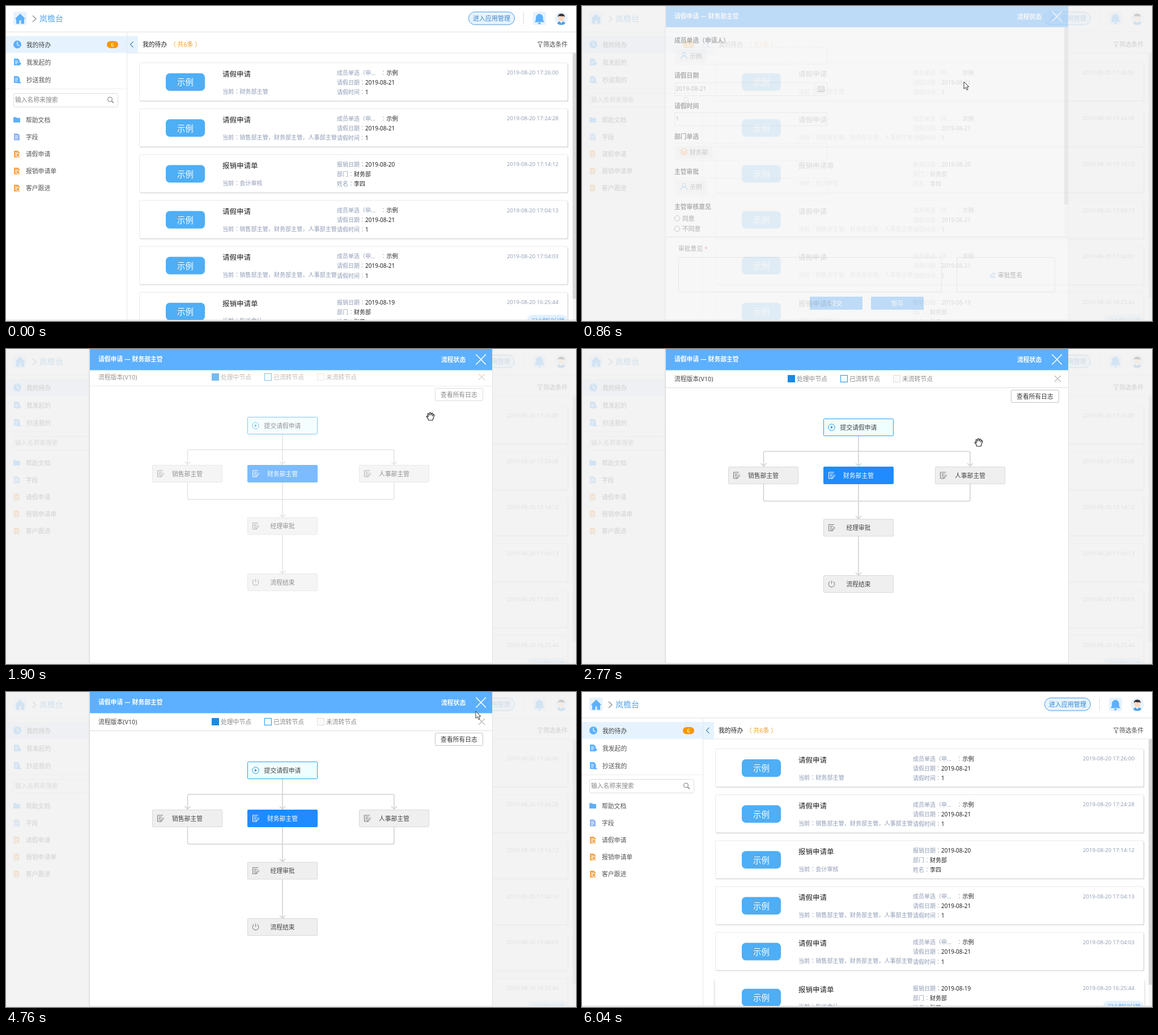
These frames come from a looping animation (1006x557 px, 6430 ms). An HTML page:

```html
<!DOCTYPE html>
<html lang="zh-CN">
<head>
<meta charset="utf-8">
<title>流程待办</title>
<style>
html, body { margin: 0; width: 100%; height: 100%; overflow: hidden; background: #fff; }
svg { display: block; width: 100vw; height: 100vh; }
text { font-family: "Noto Sans", "Noto Sans CJK SC", "Noto Sans CJK", sans-serif; white-space: pre; }
.colon { font-family: "Noto Sans CJK TC", "Noto Sans CJK", sans-serif; }
</style>
</head>
<body>
<svg id="stage" viewBox="0 0 1006 557" xmlns="http://www.w3.org/2000/svg"></svg>
<script>
const LOOP = 6430, BLUE = '#5cb0ff', MUTED = '#8f9bb5';

// Drawing helpers; text is placed by its vertical centre, full-width colons are centred in their cell.
const centreColons = str => str.replace(/：/g, '<tspan class="colon" lang="zh-TW">：</tspan>');
const text = (x, cy, str, size = 10.8, fill = '#555', extra = '') =>
  `<text x="${x}" y="${cy + size * 0.38}" font-size="${size}" fill="${fill}" ${extra}>${centreColons(str)}</text>`;
const rect = (x, y, w, h, fill, stroke = 'none', rx = 0, extra = '') =>
  `<rect x="${x}" y="${y}" width="${w}" height="${h}" fill="${fill}" stroke="${stroke}" rx="${rx}" ${extra}/>`;
const path = (d, stroke, width = 1, fill = 'none', extra = '') =>
  `<path d="${d}" stroke="${stroke}" stroke-width="${width}" fill="${fill}" ${extra}/>`;
const circle = (x, y, r, fill, stroke = 'none', extra = '') =>
  `<circle cx="${x}" cy="${y}" r="${r}" fill="${fill}" stroke="${stroke}" ${extra}/>`;
const at = (x, y, body) => `<g transform="translate(${x} ${y})">${body}</g>`;
const group = (id, body, extra = '') => `<g id="${id}" ${extra}>${body}</g>`;
const BOLD = 'font-weight="700"', MIDDLE = 'text-anchor="middle"', END = 'text-anchor="end"';

function header() {
  return rect(0, 0, 1006, 45, '#fff') + rect(0, 45, 1006, 1, '#ececec') + rect(0, 46, 1006, 1.5, '#f5f5f5') +
    rect(13, 10, 23.5, 23.5, '#e6f2ff', 'none', 3) +
    path('M25 14L33.500 22.500H31.500V31H27V25H23V31H18.500V22.500H16.500Z', BLUE, 1, BLUE, 'stroke-linejoin="round"') +
    path('M47 17L53 22.500L47 28', '#888', 1.2) +
    text(59, 22, '岚檐台', 14, '#55a5e8') +
    rect(816.5, 10.5, 81, 22.5, '#e6f3ff', '#4a98e0', 11.2) +
    text(857, 22, '进入应用管理', 11, '#3c84c8', MIDDLE) +
    rect(913, 11, 1, 22, '#ddd') +
    rect(930, 10, 23, 23.5, '#e6f2ff', 'none', 3) +
    path('M933.500 28C936 26 935.500 23 935.700 20C936 16.500 938.500 14.500 941.500 14.500S947 16.500 947.300 20C947.500 23 947 26 949.500 28Z', BLUE, 1, BLUE) +
    path('M939.500 30A2 2 0 0 0 943.500 30Z', BLUE, 1, BLUE) +
    circle(980, 22, 11.500, '#e8f2fc') +
    path('M973 31Q973.500 27 980 27T987 31Q984 33.500 980 33.500T973 31Z', 'none', 0, '#4ba3ea') +
    path('M977 26.500H983L980 30.500Z', 'none', 0, '#fff') +
    rect(975, 16, 10, 11, '#fbd9bd', 'none', 5) +
    path('M974 20Q973.500 13.500 980 13.500Q986.500 13.500 986 20L984.500 18Q980 18.500 976 17.500Z', 'none', 0, '#333640');
}

const docIcon = (color, mark) =>
  path('M0 0H7L10 3V12H0Z', 'none', 0, color) + path('M2 4H7M2 6.500H8M2 9H6', '#fff', 1) + mark;

function sidebar() {
  const form = docIcon('#f4a64b', circle(7, 8, 3, '#f4a64b', '#fff'));
  const links = [
    ['帮助文档', path('M0 1H5L6.500 2.500H12V10.500H0Z', 'none', 0, BLUE)],
    ['字段', docIcon('#8fb4f5', '')],
    ['请假申请', form], ['报销申请单', form], ['客户跟进', form]
  ];
  return rect(213, 46, 1, 511, '#e4e6ea') + rect(0, 53, 213, 30, '#e6f3ff') +
    circle(20, 68, 7, BLUE) + path('M20 63.500V68.500L23.500 70.500', '#fff', 1.2) +
    text(36, 69, '我的待办', 10.8, '#444') +
    rect(178, 62, 20, 12.5, '#f79708', 'none', 6.2) + text(188, 68.3, '6', 9.5, '#fff', MIDDLE) +
    at(14, 93, docIcon(BLUE, path('M6 9H12M9.500 6.500L12 9L9.500 11.500', BLUE, 1.6))) + text(36, 100, '我发起的') +
    at(14, 124, docIcon(BLUE, circle(9, 7, 2, BLUE) + path('M5.500 12Q9 7.500 12.500 12Z', BLUE, 1, BLUE))) + text(36, 131, '抄送我的') +
    rect(0, 146, 213, 1, '#eee') +
    rect(13.5, 154.5, 184, 24, '#fff', '#dcdcdc', 3) + text(16, 166, '输入名称来搜索', 10.8, '#888') +
    circle(183.5, 165, 4, 'none', '#777') + path('M186.500 168L190 171.500', '#777', 1.2) +
    links.map(([label, icon], i) => {
      const y = 201.5 + i * 30.1;
      return at(i ? 14 : 13, y - 6, icon) + text(35, y, label);
    }).join('');
}

const LEAVE = (status, time) => ({
  title: '请假申请', status, time,
  rows: [['成员单选（申...', '示例', 661], ['请假日期：', '2019-08-21'], ['请假时间：', '1']]
});
const EXPENSE = (status, time, date, name) => ({
  title: '报销申请单', status, time,
  rows: [['报销日期：', date], ['部门：', '财务部'], ['姓名：', name]]
});
const CHIEFS = '销售部主管，财务部主管，人事部主管';
const tasks = [
  LEAVE('财务部主管', '2019-08-20 17:26:00'),
  LEAVE(CHIEFS, '2019-08-20 17:24:28'),
  EXPENSE('会计审核', '2019-08-20 17:14:12', '2019-08-20', '李四'),
  LEAVE(CHIEFS, '2019-08-20 17:04:13'),
  LEAVE(CHIEFS, '2019-08-20 17:04:03'),
  EXPENSE('指派会计', '2019-08-20 16:25:44', '2019-08-19', '张三')
];
const cardTop = i => 100 + i * 81.15;

function card(task, i) {
  const row = ([label, value, x], k) => {
    const y = 18 + k * 17.1;
    return x
      ? text(584, y, label, 10, MUTED) + text(x, y, '：', 10, MUTED) + text(671.5, y, value, 10, '#222')
      : text(584, y, `${label}<tspan fill="#222">${value}</tspan>`, 10, MUTED);
  };
  return at(0, cardTop(i),
    group('plain' + i, rect(236, 2, 756.5, 67, '#d9d9d9', 'none', 2) + rect(235.5, 0.5, 755.5, 67, '#fff', '#e9e9e9', 2)) +
    group('hover' + i, rect(235, 0, 757, 68, '#fff', 'none', 2, 'filter="url(#lift)"')) +
    rect(282, 19, 69, 31, '#4eaef6', 'none', 7) + text(316.5, 35, '示例', 14.4, '#fff', MIDDLE) +
    text(382, 20, task.title, 12.5, '#222') +
    text(382, 50.7, '当前：' + task.status, 10.1, MUTED) +
    task.rows.map(row).join('') +
    text(975, 17.5, task.time, 9.65, '#95a0b8', END));
}

function list() {
  return rect(214, 53, 19, 30, '#e6f3ff') + path('M224.500 63L219.500 68L224.500 73', '#4a8fd0', 1.2) +
    text(241, 68, '我的待办', 10.8, '#222') + text(289, 68, '（ 共6条 ）', 10.8, '#f0a030') +
    path('M938.500 63.500H946.500L943.500 67.500V73L941.500 71.500V67.500Z', '#666') + text(948, 68, '筛选条件') +
    rect(214, 82.5, 792, 1, '#e4e4e4') +
    `<g clip-path="url(#listClip)">${tasks.map(card).join('')}` +
    rect(920, 546, 71, 20, '#e3f1ff', 'none', 9) + text(956.5, 555.5, '22小时50分钟', 9.2, '#4a9be8', MIDDLE) + '</g>' +
    rect(1000, 83, 6, 472, '#f5f5f5') + rect(1000, 83, 6, 435, '#d8d8d8', 'none', 2) +
    rect(0, 555, 1006, 1, '#cfcfcf');
}

const personIcon = circle(0, -2.5, 3, 'none', '#68b2f0') + path('M-5.500 6Q-5 1 0 1T5.500 6', '#68b2f0', 1.1);
const layersIcon = path('M-6 -2L0 -5.500L6 -2L0 1.500ZM-6 0.500L0 4L6 0.500M-6 3L0 6.500L6 3', '#f3ae62', 1.1);

function form() {
  const label = (y, s) => text(163, y, s, 10.8, '#333', BOLD);
  const picker = (y, s, icon, w) =>
    rect(163.5, y + 0.5, 269, 30, '#fff', '#e2e2e2', 0, 'stroke-dasharray="3 2"') +
    rect(166, y + 4, w, 24, '#f5f5f5', 'none', 2) + at(180, y + 15, icon) + text(190, y + 16, s, 10.8, '#777');
  const input = (y, s) => rect(163.5, y + 0.5, 269, 23, '#fff', '#ddd') + text(165, y + 11.5, s, 10.5, '#777');
  const radio = (y, s) => circle(168, y, 4.7, '#fff', '#777') + text(177, y, s, 10.8, '#333');
  const button = (x, s) => rect(x, 514, 93, 23, BLUE, 'none', 1) + text(x + 46.5, 525.7, s, 10.8, '#fff', MIDDLE + ' font-weight="500"');
  return label(61, '成员单选（申请人）') + picker(72.5, '示例', personIcon, 54) +
    label(123, '请假日期') + input(135, '2019-08-21') + path('M410.500 135V158', '#ddd') +
    path('M416.500 142.500H427.500V151.500H416.500ZM416.500 145H427.500M419 148H425.500M419 150H425.500M419 140.500V142.500M425 140.500V142.500', '#999') +
    label(177, '请假时间') + input(188, '1') +
    label(231, '部门单选') + picker(242.5, '财务部', layersIcon, 65) +
    label(293, '主管审批') + picker(304, '示例', personIcon, 54) +
    label(355, '主管审核意见') + radio(375.5, '同意') + radio(394, '不同意') +
    rect(851, 38, 7, 370, '#f4f4f4') + rect(851, 38, 7, 313, '#d6d6d6', 'none', 2) +
    path('M148 408.500H858', '#aaa', 1, 'none', 'stroke-dasharray="2.500 1.500"') +
    text(170, 429, '审批意见 <tspan fill="#e05a4a">*</tspan>', 10.8, '#444') +
    rect(170.5, 444.5, 464, 61, '#fff', '#d2d2d2', 1) + rect(661.5, 444.5, 173, 61, '#fff', '#d2d2d2', 1) +
    path('M720.500 479.500L722 475.500L727 471.500L729.500 474L724 478.500ZM724.500 480H730', '#4b9fe8') +
    text(734, 476, '审批签名', 10.8, '#444') + button(402, '提交') + button(510, '暂存');
}

function flow() {
  const GRAY = '#d2d2d2';
  const editIcon = color => path('M4.500 -5.500H-5V5.500H2M-3 -2.500H2.500M-3 0H1M-3 2.500H0M5.500 -2L1 3L0.500 5L2.500 4.500L6.500 0', color);
  const playIcon = circle(0, 0, 5.7, 'none', '#2196e8') + path('M-1.500 -2.500L2.500 0L-1.500 2.500Z', 'none', 0, '#2196e8');
  const powerIcon = path('M-3 -4.300A5.300 5.300 0 1 0 3 -4.300M0 -6V0', '#888', 1.1);
  const node = (cx, y, s, icon, fill = '#efefef', stroke = '#d8d8d8', color = '#444') =>
    rect(cx - 61.5, y + 0.5, 123, 30, fill, stroke, 1) + at(cx - 47.5, y + 15.5, icon) + text(cx, y + 15.7, s, 10.8, color, MIDDLE);
  const legend = (x, s, fill, stroke) => rect(x + 0.5, 46.5, 12, 12, fill, stroke) + text(x + 16, 52.5, s, 10.8, '#888');
  const arrow = (x, y) => `M${x - 5} ${y - 5}L${x} ${y}L${x + 5} ${y - 5}`;
  const wires = 'M488 154V207M320.500 207V184Q320.500 181 323.500 181H682Q685 181 685 184V207' +
    'M320.500 239V266Q320.500 269 323.500 269H682Q685 269 685 266V239M488 239V300M488 331V400' +
    arrow(320.5, 207) + arrow(488, 207) + arrow(685, 207) + arrow(488, 300) + arrow(488, 400);
  return rect(148, 68, 710, 1, '#dedede') + text(163, 52.5, '流程版本(V10)', 10.8, '#444') +
    legend(363, '处理中节点', '#188be3', '#188be3') + legend(456, '已流转节点', '#effeff', '#2196e8') + legend(549, '未流转节点', '#fafafa', '#ddd') +
    path('M834 47L845 58M845 47L834 58', '#888') +
    rect(757.5, 72.5, 84, 22, '#fff', '#c4c4c4', 1) + text(799.5, 84, '查看所有日志', 10.8, '#333', MIDDLE) +
    path(wires, GRAY, 1.6) +
    node(488, 123, '提交请假申请', playIcon, '#effeff', '#2c9ee6') +
    node(320, 208, '销售部主管', editIcon('#777')) +
    node(488, 208, '财务部主管', editIcon('#fff'), '#1f8bff', '#1f8bff', '#fff') +
    node(685, 208, '人事部主管', editIcon('#777')) +
    node(488, 300.5, '经理审批', editIcon('#777')) + node(488, 400, '流程结束', powerIcon);
}

function modal() {
  return rect(146, 0, 713, 556, '#e2e2e2') + rect(148, 0, 710, 555, '#fff') +
    group('form', form()) + group('flow', flow()) +
    rect(148, 0, 710, 37.5, BLUE) + group('tab', rect(754, 0, 65, 38, '#72bbff')) +
    text(163, 18, '请假申请 — 财务部主管', 10.8, '#fff', BOLD) + text(768, 18.5, '流程状态', 10.8, '#fff', BOLD) +
    path('M829.500 9.500L847 27.500M847 9.500L829.500 27.500', '#fff', 1.6);
}

function cursors() {
  const pointer = 'M-1.500 1Q0 -1 1.500 1V7Q3 5.500 4 7.300Q5.500 6 6.500 8Q8.500 7.200 8.500 9.500V12Q8.500 14 7 17.500H0.500Q-1 14.500 -5 10.500Q-5 8 -1.500 10.500Z';
  const grab = 'M-3 7Q-4 3.500 -6.800 0.500Q-6.500 -1.500 -3.800 0.500L-5 -4Q-4 -6 -2.800 -4L-2 -1.500L-1.800 -6Q0 -7.500 0.600 -6L1 -1.700L2.200 -5.500Q4 -6.500 4.100 -4.700L3.800 -1L5.500 -3.200Q7 -3.500 6.800 -1.500Q5 3 4 7Z';
  const arrow = 'M0 0V12.500L3 9.800L5 14.500L7.200 13.500L5.200 9H9Z';
  return group('click', circle(-0.5, 0.5, 9, '#f0845c', 'none', 'fill-opacity="0.75"')) +
    group('pointer', path(pointer, '#222', 1.1, '#fff') + path('M1.500 7V10M4 7.500V10M6.500 8.500V10', '#222', 0.9)) +
    group('grab', path(grab, '#222', 1.1, '#fff')) + group('arrow', path(arrow, '#333', 1, '#fff'));
}

const stage = document.getElementById('stage');
stage.innerHTML = `<defs>
  <clipPath id="listClip"><rect x="214" y="84" width="786" height="471"/></clipPath>
  <filter id="lift" x="-5%" y="-30%" width="110%" height="170%"><feDropShadow dx="0" dy="4" stdDeviation="2.5" flood-color="#000" flood-opacity="0.22"/></filter>
  </defs>` + rect(0, 0, 1006, 557, '#fff') + list() + sidebar() + header() +
  group('mask', rect(0, 0, 1006, 557, '#f0f0f0', 'none', 0, 'fill-opacity="0.8"')) +
  group('modal', modal()) + group('cursor', cursors());

const $ = id => document.getElementById(id);
const show = (id, on) => $(id).setAttribute('visibility', on ? 'inherit' : 'hidden');
const fade = (id, value) => { $(id).setAttribute('opacity', value); show(id, value > 0); };

// Interpolates rows of [time, ...values].
function track(t, keys, ease = k => k) {
  if (t <= keys[0][0]) return keys[0].slice(1);
  const i = keys.findIndex(key => key[0] > t);
  if (i < 0) return keys[keys.length - 1].slice(1);
  const [a, b] = [keys[i - 1], keys[i]], k = ease((t - a[0]) / (b[0] - a[0]));
  return a.slice(1).map((v, j) => v + (b[j + 1] - v) * k);
}
const smooth = k => k * k * (3 - 2 * k);

const route = [
  [70, 690, 575], [550, 674, 134], [1180, 674, 134], [1420, 799, 22], [1660, 799, 22],
  [1900, 749, 119], [2130, 700, 165], [2770, 700, 165], [3490, 507, 172], [3730, 488, 190],
  [4120, 488, 190], [4760, 829, 34], [5080, 838, 18], [5560, 838, 18], [5960, 800, 575]
];
const clicks = [[550, 710], [1500, 1660], [5400, 5560]];
const bursts = [0, 70, 1180, 2770, 4120, 5400];

// Motion advances in 80 ms ticks counted from the start of each burst.
function tick(t) {
  const start = bursts.filter(b => b <= t).pop();
  return start + Math.floor((t - start) / 80) * 80;
}

function render(now) {
  const t = tick(now % LOOP);
  const [x, y] = track(t, route, smooth);
  const [mask] = track(t, [[630, 0], [790, 1], [5560, 1], [5720, 0]]);
  const [panel] = track(t, [[710, 0], [940, 1], [5560, 1], [5720, 0]]);
  const [flowAlpha, flowY] = track(t, [[1740, 0, -9], [1900, 0.58, -3], [2060, 1, 0]]);
  const inList = panel === 0;

  fade('mask', mask);
  fade('modal', panel);
  show('form', t < 1740);
  fade('flow', flowAlpha);
  $('flow').setAttribute('transform', `translate(0 ${flowY})`);

  const onTab = x > 754 && x < 819 && y < 38;
  show('tab', onTab);

  let hovered = -1;
  tasks.forEach((_, i) => {
    const reach = Math.min(y, 556) - cardTop(i);
    const inside = t >= 70 && inList && reach >= 0 && reach < 68;
    if (inside) hovered = i;
    show('hover' + i, inside);
    show('plain' + i, !inside);
  });

  const onClose = Math.abs(x - 838) < 10 && Math.abs(y - 18) < 11;
  const kind = inList ? (hovered >= 0 ? 'pointer' : 'arrow')
    : onTab || onClose ? 'pointer'
    : flowAlpha > 0 && y > 69 ? 'grab' : 'arrow';
  ['pointer', 'grab', 'arrow'].forEach(id => show(id, id === kind));
  show('click', clicks.some(([from, to]) => t >= from && t < to));
  show('cursor', t >= 70);
  $('cursor').setAttribute('transform', `translate(${x} ${y})`);
}

const begin = performance.now();
function loop() {
  render(performance.now() - begin);
  requestAnimationFrame(loop);
}
loop();
</script>
</body>
</html>
```
